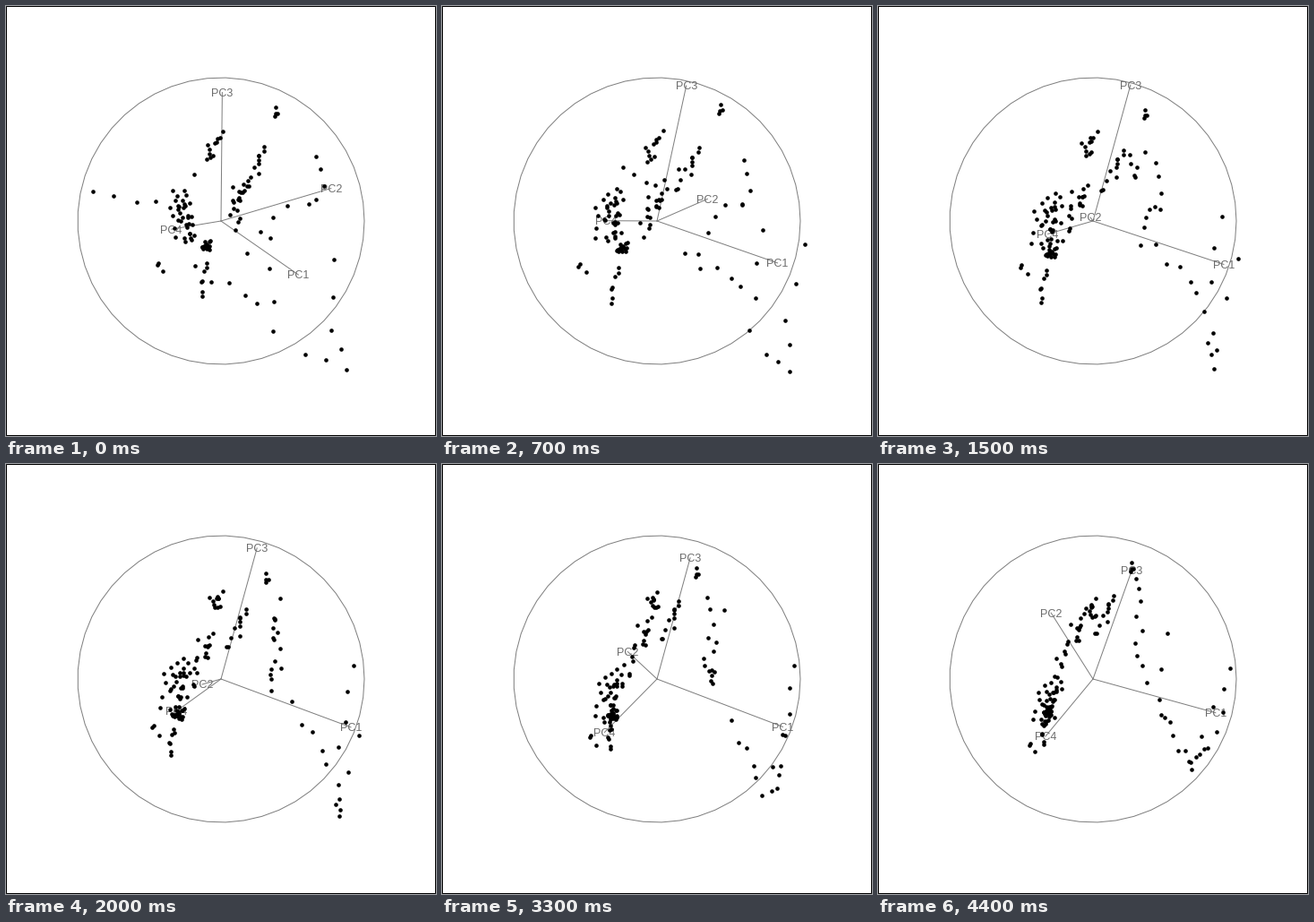
These frames come from a looping animation (480x480 px, 4500 ms). A matplotlib script:

```python
import numpy as np
import matplotlib.pyplot as plt
from matplotlib.animation import FuncAnimation
from matplotlib.patches import Polygon, Rectangle

SIZE, DPI, FRAMES, STEP = 480, 100, 45, 100
MID, RADIUS = 240, 160
PX = 72 / DPI
GREY, INK = "#7f7f7f", "#6c6c6c"
rng = np.random.default_rng(11)

# Key poses of the tour: tips of PC1..PC4 in pixels from the middle, y down.
TIMES = np.array([0, 11, 20, 27, 44])
POSES = np.array([
    [(86, 60), (122, -36), (1, -143), (-55, 9)],
    [(144, 45), (20, -16), (40, -152), (-53, 0)],
    [(145, 54), (-21, 6), (40, -146), (-50, 36)],
    [(142, 56), (-26, -10), (37, -140), (-58, 52)],
    [(137, 38), (-47, -74), (43, -121), (-53, 64)],
], float)
SLOPES = np.gradient(POSES, TIMES, axis=0)


def basis(frame):
    """Projection (4 x 2) at a frame: a smooth path kept orthonormal."""
    i = min(np.searchsorted(TIMES, frame, side="right") - 1, len(TIMES) - 2)
    h = TIMES[i + 1] - TIMES[i]
    s = (frame - TIMES[i]) / h
    a = ((1 + 2 * s) * (1 - s) ** 2 * POSES[i] + s * s * (3 - 2 * s) * POSES[i + 1]
         + h * s * (1 - s) ** 2 * SLOPES[i] - h * s * s * (1 - s) * SLOPES[i + 1])
    u, _, vt = np.linalg.svd(a, full_matrices=False)
    return RADIUS * u @ vt


def strand(n, spread, *path):
    """Scatter n points along a path of (x, y at start, x, y at end)."""
    path = np.array(path, float)
    t = np.linspace(0, len(path) - 1, n)
    line = np.column_stack([np.interp(t, range(len(path)), p) for p in path.T])
    jitter = np.clip(rng.normal(size=(n, 2)), -1.8, 1.8) * spread
    return line + np.tile(jitter, 2)


spots = np.vstack([
    # dense left arm
    strand(34, 7, (192, 213, 196, 245), (203, 262, 184, 288)),
    strand(16, 2.8, (223, 267, 189, 275)),
    strand(7, 2, (225, 286, 187, 286), (215, 324, 181, 313)),
    strand(3, 3, (171, 291, 171, 316)),
    # arch at the top
    strand(18, 4, (268, 198, 228, 170), (255, 215, 218, 195), (259, 243, 200, 230)),
    strand(11, 4, (236, 140, 235, 151), (226, 172, 241, 172)),
    strand(11, 3, (289, 156, 264, 146), (274, 200, 247, 188)),
    strand(4, 4, (299, 119, 281, 116)),
    # loose right arm
    strand(9, 3, (345, 168, 287, 128), (355, 214, 292, 164),
           (310, 222, 288, 203), (268, 279, 299, 247)),
    strand(4, 1.5, (296, 261, 394, 230), (298, 361, 378, 297)),
    strand(7, 1.5, (366, 286, 374, 274), (364, 362, 348, 332),
           (382, 406, 361, 324), (333, 386, 367, 314)),
    strand(5, 4, (282, 329, 352, 338), (208, 292, 326, 305)),
    strand(6, 1.5, (96, 205, 325, 286), (155, 225, 311, 281), (209, 190, 322, 191)),
])
DATA = (spots - MID) @ np.linalg.inv(np.hstack([basis(0), basis(FRAMES - 1)]))

fig = plt.figure(figsize=(SIZE / DPI, SIZE / DPI), dpi=DPI, facecolor="white")
ax = fig.add_axes([0, 0, 1, 1])
ax.set(xlim=(0, SIZE), ylim=(SIZE, 0))
ax.axis("off")

turn = np.linspace(0, 2 * np.pi, 50)
ring = MID + RADIUS * np.column_stack([np.cos(turn), np.sin(turn)])
ax.add_patch(Polygon(ring, fill=False, ec=GREY, lw=PX))
ax.add_patch(Rectangle((0.5, 0.5), SIZE - 1, SIZE - 1, fill=False,
                       ec="black", lw=PX, snap=False))

spokes = [ax.plot([], [], color=GREY, lw=PX, zorder=2)[0] for _ in range(4)]
labels = [ax.text(0, 0, f"PC{i + 1}", family="Liberation Sans", size=12.5 * PX,
                  color=INK, ha="center", va="baseline", zorder=3)
          for i in range(4)]
dots, = ax.plot([], [], "o", color="black", ms=4.6 * PX, mew=0, zorder=4)


def draw(frame):
    a = basis(frame)
    for (x, y), spoke, label in zip(MID + a, spokes, labels):
        spoke.set_data([MID, x], [MID, y])
        label.set_position((x, y + 4.4))
    dots.set_data(*(MID + DATA @ a).T)
    return [*spokes, *labels, dots]


anim = FuncAnimation(fig, draw, frames=FRAMES, interval=STEP,
                     repeat=True, repeat_delay=0, blit=False)
plt.show()
```
